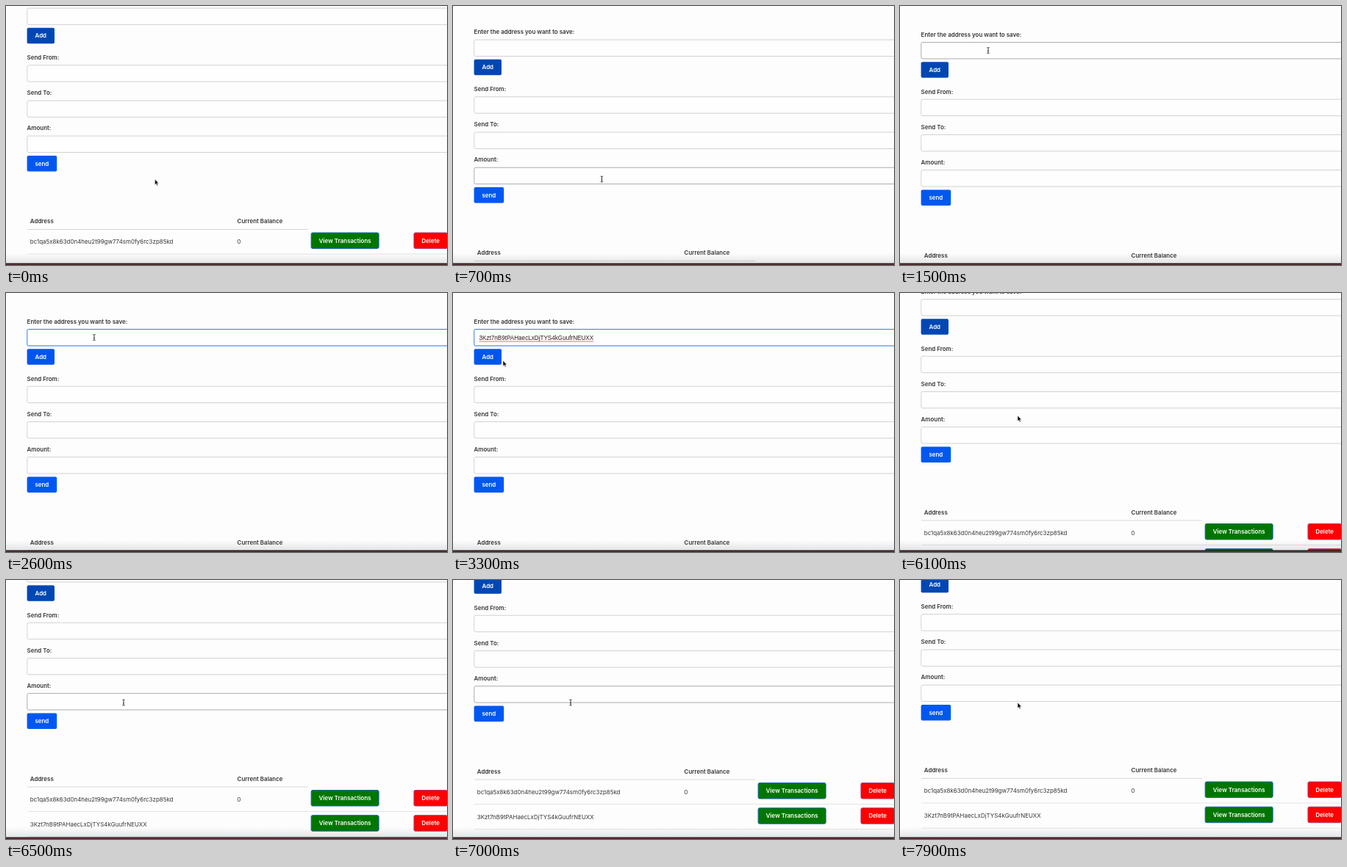
These frames come from a looping animation (600 px wide and 353 px high, 8 s). An HTML page:

```html
<!DOCTYPE html>
<html lang="en">
<head>
<meta charset="utf-8">
<title>Wallet form</title>
<style>
  html, body { margin: 0; width: 100%; height: 100%; overflow: hidden; background: #fdfdfd; }
  svg { display: block; }
  text { font: 400 7.95px Inter, sans-serif; fill: #363636; }
  .bold { font-weight: 600; }
  .on-button { font-weight: 600; fill: #fff; }
  .typed { font: 8.13px "Liberation Sans", Arial, sans-serif; fill: #222; }
  .input { fill: #fefefe; stroke: #d2d2d2; }
  .input.hover { stroke: #adadad; }
  .input.focus { stroke: #4a80ea; }
</style>
</head>
<body>
<svg width="600" height="353" viewBox="0 0 600 353">
  <defs>
    <linearGradient id="shade" x2="0" y2="1">
      <stop offset="0" stop-color="#000" stop-opacity="0"/>
      <stop offset="1" stop-color="#000" stop-opacity=".1"/>
    </linearGradient>
  </defs>
  <g id="page"></g>
  <rect y="337" width="600" height="14" fill="url(#shade)"/>
  <rect y="350.5" width="600" height="1.5" fill="#262224"/>
  <rect y="352" width="600" height="1" fill="#693439"/>
  <g id="cursor">
    <path id="arrow" d="M0 0V7.8L1.8 6.2 3 8.9 4.3 8.3 3.1 5.7H5.4Z"
      fill="#111" stroke="#fff" stroke-width=".5"/>
    <path id="ibeam" d="M-1.6-4Q0-4 0-3Q0-4 1.6-4M0-3V3M-1.6 4Q0 4 0 3Q0 4 1.6 4M-.8 .8H.8"
      fill="none" stroke="#222" stroke-width=".9"/>
    <path id="hand" d="M3.6 .8Q4.4-.2 5 .9V3.6Q5.8 2.8 6.4 3.7Q7.2 3 7.7 4Q8.6 3.5 8.8 4.6V6.6L8 9H4.6L2 5.6Q2 4.6 3.6 5.6Z"
      fill="#fff" stroke="#222" stroke-width=".8"/>
  </g>
</svg>
<script>
const LOOP = 8000, STEP = 100;
const FOCUS = 2100, PASTE = 2800, SUBMIT = 5000, BLINK = 500;
const wallets = [
  { address: "bc1qa5x8k63d0n4heu2t99gw774sm0fy6rc3zp85kd", balance: "0" },
  { address: "3Kzt7nB9tPAHaecLxDjTYS4kGuufrNEUXX", balance: "" },
];

// Keys: time, values..., eased toward the next key.
const scrollKeys = [[0, 46.5], [100, 45], [900, 0], [5800, 0], [6100, 41], [6500, 69], [6600, 69], [7200, 80.5]];
const cursorKeys = [[0, 202.5, 236], [700, 202.5, 236], [1400, 120, 60.5], [2800, 120, 60.5],
  [3300, 68, 92], [3400, 66, 90], [5400, 66, 90], [5800, 160, 167]];

const byId = id => document.getElementById(id);
const page = byId("page");

function add(tag, attributes, content = "", parent = page) {
  const node = document.createElementNS("http://www.w3.org/2000/svg", tag);
  for (const name in attributes) node.setAttribute(name, attributes[name]);
  node.textContent = content;
  return parent.appendChild(node);
}

const text = (x, y, content, kind = "", parent = page) =>
  add("text", { x, y, class: kind }, content, parent);

const line = (y, right, color, parent = page) =>
  add("path", { d: `M29 ${y}H${right}`, stroke: color, "stroke-width": .8 }, "", parent);

function button(x, y, width, label, fill, stroke = "none", parent = page) {
  const box = add("rect", { x, y, width, height: 21.5, rx: 2, fill, stroke }, "", parent);
  text(x + width / 2, y + 13.6, label, "on-button", parent).setAttribute("text-anchor", "middle");
  return box;
}

function field(y, label) {
  text(28.6, y - 7.7, label, "bold");
  const ring = add("rect", { x: 28, y: y - .8, width: 610, height: 24, rx: 2.5, fill: "#c9d9fa" });
  const box = add("rect", { x: 28.8, y, width: 610, height: 22.4, rx: 2, class: "input" });
  return { y, ring, box };
}

const fields = [
  field(49.5, "Enter the address you want to save:"),
  field(127.2, "Send From:"),
  field(175.5, "Send To:"),
  field(223.6, "Amount:"),
];
const addButton = button(28.6, 76.3, 37.4, "Add", "#0055ee");
button(28.6, 250.4, 40.6, "send", "#0058f0");

const typed = text(35.5, 63.7, wallets[1].address, "typed");
const misspelling = add("path", { stroke: "#e8484c", "stroke-width": .8 });
const caret = add("rect", { y: 56, width: .8, height: 10, fill: "#222" });

text(32.8, 342.8, "Address", "bold");
text(314.6, 342.8, "Current Balance", "bold");
line(351, 411, "#cfcfcf");
const rows = wallets.map(({ address, balance }, i) => {
  const row = add("g", {}), y = 355.5 + 34.2 * i;
  text(32.8, y + 15.2, address, "", row);
  text(314.6, y + 15.2, balance, "", row);
  button(415.2, y, 92, "View Transactions", "#007600", "#1668b4", row);
  button(555, y, 45.5, "Delete", "#ff0000", "#b03c70", row);
  line(y + 29, 600, "#dedede", row);
  return row;
});

function valueAt(keys, t) {
  const next = keys.findIndex(key => key[0] > t);
  if (next < 0) return keys.at(-1).slice(1);
  const from = keys[next - 1], to = keys[next];
  const p = (t - from[0]) / (to[0] - from[0]);
  const eased = Math.sin(p * Math.PI / 2);
  return from.slice(1).map((v, i) => v + (to[i + 1] - v) * eased);
}

const show = (node, visible) => node.setAttribute("visibility", visible ? "visible" : "hidden");

function render(t) {
  const [scroll] = valueAt(scrollKeys, t);
  const [x, y] = valueAt(cursorKeys, t);
  const docY = y + scroll;
  const focused = t >= FOCUS && t < SUBMIT;
  const pasted = t >= PASTE && t < SUBMIT;

  page.setAttribute("transform", `translate(0 ${-scroll})`);

  let overField = false;
  fields.forEach((f, i) => {
    const hover = x > 28 && docY >= f.y && docY <= f.y + 22.4;
    const active = focused && i === 0;
    overField ||= hover;
    f.box.setAttribute("class", "input" + (active ? " focus" : hover ? " hover" : ""));
    show(f.ring, active);
  });
  const overAdd = x <= 66 && docY >= 76 && docY <= 98;
  addButton.setAttribute("fill", !focused || overAdd ? "#0047b4" : "#0055ee");

  const end = 35.5 + (pasted ? typed.getComputedTextLength() : 0);
  const sinceEdit = t - (pasted ? PASTE : FOCUS);
  show(typed, pasted);
  show(misspelling, pasted);
  misspelling.setAttribute("d", `M35.5 66H${end}`);
  caret.setAttribute("x", end);
  show(caret, focused && Math.floor(sinceEdit / BLINK) % 2 === 0);
  show(rows[1], t >= SUBMIT + 400);

  byId("cursor").setAttribute("transform", `translate(${x} ${y})`);
  show(byId("hand"), overAdd);
  show(byId("ibeam"), overField && !overAdd);
  show(byId("arrow"), !overField && !overAdd);
}

const start = performance.now();
function tick() {
  const t = (performance.now() - start) % LOOP;
  render(Math.floor(t / STEP) * STEP);
  requestAnimationFrame(tick);
}
tick();
</script>
</body>
</html>
```
